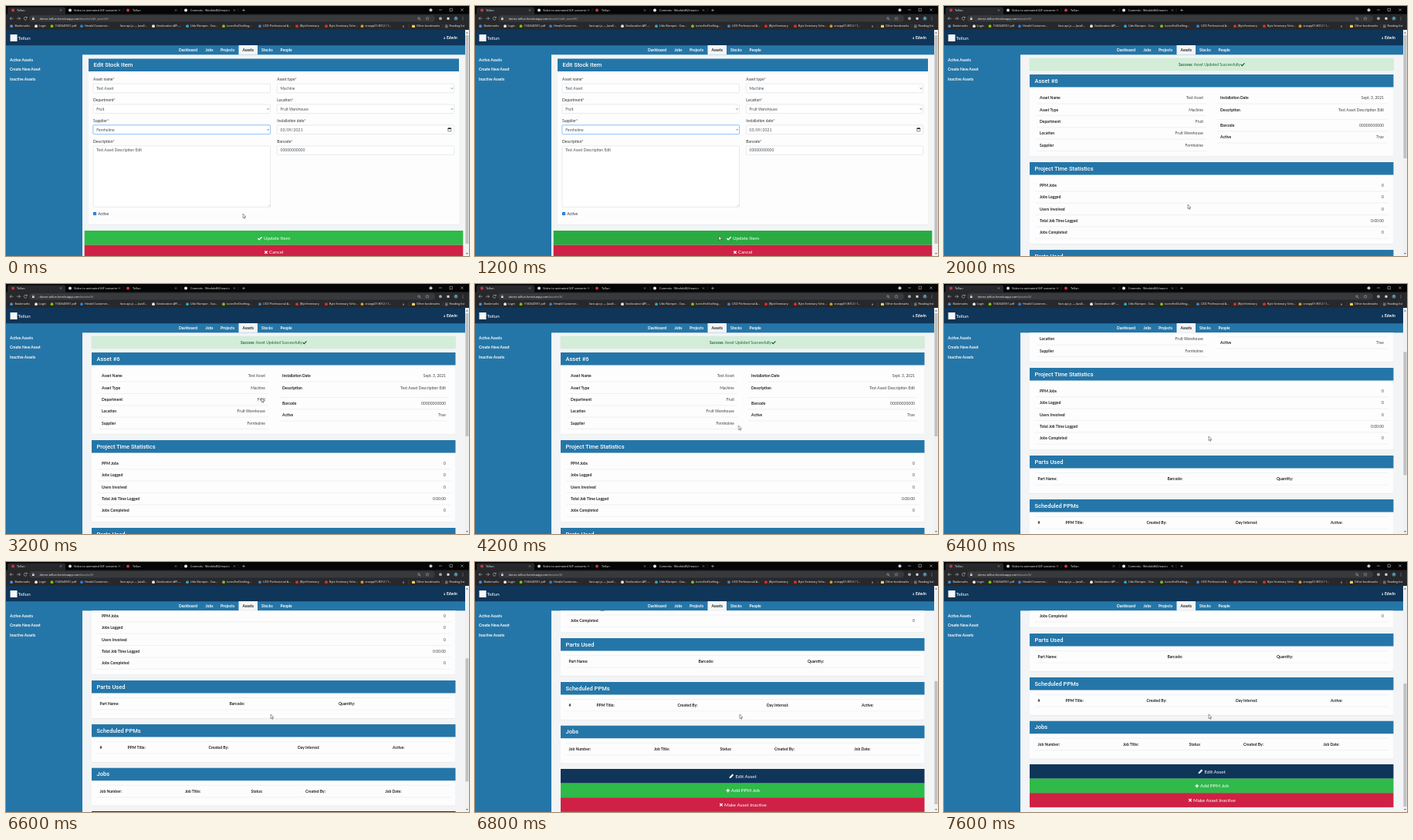
Animation of 600x325 px, one loop 8 s. Source, as an HTML page:

```html
<!DOCTYPE html>
<html lang="en">
<head>
<meta charset="utf-8">
<title>Asset manager</title>
<style>
html, body { margin: 0; width: 100%; height: 100%; overflow: hidden; background: #f3f4f5; }
svg { display: block; width: 600px; height: 325px; font: 5px Lato, sans-serif; }
.ui { font-family: "Open Sans", sans-serif; }
.head { font: 500 7.5px Roboto, sans-serif; }
#stage, #edit, #asset, #update, #cursor { animation: 8s step-end -20ms infinite; }
#stage { animation-name: scroll; }
#edit { animation-name: leave; }
#asset { animation-name: enter; }
#update { animation-name: hover; }
#cursor { animation-name: move; }
#sheet { transform: translateY(calc(var(--s) * -1px)); }
#thumb { transform: translateY(calc(var(--s) * .536px)); }
@keyframes leave { 0% { visibility: visible } 20%, 100% { visibility: hidden } }
@keyframes enter { 0% { visibility: hidden } 20%, 100% { visibility: visible } }
@keyframes hover { 0% { fill: #2fba49 } 7.5% { fill: #29ab42 } 20%, 100% { fill: #2fba49 } }
@keyframes scroll {
  0% { --s: 0 } 75% { --s: 12 } 77.5% { --s: 47 } 80% { --s: 94 }
  82.5% { --s: 163 } 85% { --s: 218 } 87.5%, 100% { --s: 224 }
}
@keyframes move {
  0% { transform: translate(307px, 270px) }
  2.5% { transform: translate(309px, 279px) }
  5% { transform: translate(313px, 291px) }
  7.5% { transform: translate(316px, 299px) }
  17.5% { transform: translate(316px, 297px) }
  20% { transform: translate(316px, 285px) }
  22.5% { transform: translate(316px, 268px) }
  25% { transform: translate(316px, 258px) }
  27.5% { transform: translate(319px, 178px) }
  30% { transform: translate(318px, 150px) }
  32.5% { transform: translate(317px, 128px) }
  35% { transform: translate(321px, 119.5px) }
  37.5% { transform: translate(327px, 128px) }
  40% { transform: translate(331px, 148px) }
  42.5% { transform: translate(332px, 170px) }
  45% { transform: translate(335px, 178px) }
  47.5% { transform: translate(338px, 182px) }
  50% { transform: translate(340px, 184px) }
  52.5% { transform: translate(341.5px, 184px) }
  55% { transform: translate(342px, 190px) }
  57.5% { transform: translate(342px, 206px) }
  60% { transform: translate(342.5px, 202px) }
  62.5%, 100% { transform: translate(343px, 198px) }
}
</style>
</head>
<body>
<svg id="stage" viewBox="0 0 600 325"></svg>
<script>
const blue = '#2576a8', navy = '#0f3559', green = '#2fba49', red = '#cf2145', bar = '#27282b';

// y is the middle of the text line
const text = (x, y, s, fill = '#333', size = 5, attr = '') =>
  `<text x="${x}" y="${y + size * .35}" fill="${fill}" font-size="${size}" ${attr}>${s}</text>`;
const bold = (x, y, s, fill = '#222') => text(x, y, s, fill, 5, 'font-weight="700"');
const right = (x, y, s) => text(x, y, s, '#444', 5, 'text-anchor="end"');
const ui = (x, y, s, size = 3.7, fill = '#f4f5f6') => text(x, y, s, fill, size, 'class="ui"');
const rect = (x, y, w, h, fill, attr = '') =>
  `<rect x="${x}" y="${y}" width="${w}" height="${h}" fill="${fill}" ${attr}/>`;
const dot = (x, y, r, fill) => `<circle cx="${x}" cy="${y}" r="${r}" fill="${fill}"/>`;
const line = (d, color = '#dcdfe2', w = .4) =>
  `<path d="${d}" fill="none" stroke="${color}" stroke-width="${w}"/>`;
const rule = (x, y, w) => line(`M${x} ${y}h${w}`);
const check = (x, y, c, k = 1) =>
  line(`M${x - 2.6 * k} ${y}l${1.8 * k} ${1.8 * k} ${3.6 * k} ${-3.6 * k}`, c, 1.3 * k);
const cross = (x, y, r, c, w) =>
  line(`M${x - r} ${y - r}l${2 * r} ${2 * r}m0 ${-2 * r}l${-2 * r} ${2 * r}`, c, w);
const plus = (x, y, r, c, w) => line(`M${x - r} ${y}h${2 * r}M${x} ${y - r}v${2 * r}`, c, w);
const title = (x, y, s) => text(x, y, s, '#fff', 7.5, 'class="head"');

function card(x, y, w, h, name) {
  return rect(x, y + .6, w, h, '#dfe1e3', 'rx="1.5"') + rect(x, y, w, h, '#fdfdfd', 'rx="1.5"') +
    rect(x, y, w, 16.5, blue) + title(x + 6.5, y + 8, name);
}

function button(y, fill, x, s, icon, left = 111, w = 471.5, attr = '') {
  return rect(left, y, w, 18.7, fill, attr) + icon + text(x, y + 9.5, s, '#fff', 6.25);
}

function browser() {
  const gray = '#dcdee1';
  let out = rect(0, 0, 600, 11, '#050506') + rect(0, 10.5, 600, 20.5, bar) +
    rect(2, 1.5, 75, 11, bar, 'rx="2"') + rect(30, 12, 526, 8.4, '#38393c', 'rx="4.2"');
  const tabs = [[9, 14, 'Tellun', 71, '#c8383f'], [83, 88, 'Video to animated GIF converte', 147, '#d5d8dc'],
    [158, 164, 'Tellun', 220, '#c8383f'], [233, 239, 'Commits · Wexfold82/react-r', 296, '#f0f0f0']];
  for (const [ix, x, s, cx, c] of tabs)
    out += dot(ix, 5.5, 2, c) + ui(x, 5.3, s, 3.85) + cross(cx, 5.5, 1.1, gray, .4);
  out += plus(308, 5.5, 1.8, gray, .5) + line('M152 3v5M227 3v5M301 3v5', '#555', .3) +
    dot(550.5, 5.2, 2, '#c6c8cb') + line('M561 5h4M575 3.2h3.4v3.4h-3.4z', gray, .5) + cross(591, 5, 1.6, gray, .5);
  // toolbar
  out += line('M9.5 16.2h-4.5m2-2l-2 2 2 2M14 16.2h4.5m-2-2l2 2-2 2', gray, .5) +
    line('M27 15.2a2 2 0 1 0 .1 1.8M27.3 13.8v1.6h-1.6', gray, .5) +
    rect(34, 15.8, 2.6, 2.2, gray) + line('M34.5 16v-.8a.8.8 0 0 1 1.6 0v.8', gray, .4) +
    line('M536 17l1.4 1.4', gray, .5) + `<circle cx="535" cy="16" r="1.3" fill="none" stroke="${gray}" stroke-width=".4"/>` +
    line('M546 14l.7 1.5 1.6.1-1.2 1 .4 1.6-1.5-.8-1.5.8.4-1.6-1.2-1 1.6-.1z', gray, .3) +
    dot(563, 16.2, 2, '#9aa0a6') + rect(571.5, 14.8, 3, 3, gray) + dot(583, 16.2, 2.5, '#3e7d8a') +
    ui(582.4, 16.2, 'E', 2.8) + dot(592, 14.4, .45, gray) + dot(592, 16.2, .45, gray) + dot(592, 18, .45, gray);
  // bookmarks
  const marks = [[7, 11.5, 'Bookmarks', '#4a90e2'], [39, 42.5, 'Login', '#eee'], [59.5, 63.5, '1582640931.pdf', '#7ac70c'],
    [98, 102, 'Herald Customer...', '#2f80d8'], [144, 148, 'face-api.js — JavaS...', bar],
    [191, 195, 'Geolocation API -...', '#eee'], [235, 239, 'Udo Klamper - Coa...', '#27a9d6'],
    [282, 286, 'tunesForDrafting...', '#78c52a'], [329, 333, 'UCD Professional A...', '#3c86c8'],
    [377, 381, 'JByteSeminary', '#d8322f'], [415, 419, 'Byte Seminary Sche...', '#d8322f'],
    [461.5, 465.5, 'srvapp01:8012 / 1...', '#d99a2b']];
  for (const [ix, x, s, c] of marks) out += dot(ix, 26.2, 1.9, c) + ui(x, 26.2, s);
  return out + ui(514, 26, '»', 4.4) + line('M522 23.5v5.5M566 23.5v5.5', '#66696d', .3) +
    rect(526, 24.8, 4, 3.2, '#f2cf63', 'rx=".4"') + ui(532, 26.2, 'Other bookmarks') +
    line('M569 25h3.6M569 26.4h3.6M569 27.8h3.6', gray, .5) + ui(574.5, 26.2, 'Reading list');
}

function frame() {
  let out = rect(0, 31, 595, 20, navy) + rect(0, 51, 595, 12.3, blue) + rect(0, 63, 99, 262, blue) +
    rect(0, 51, 595, .7, '#1e628f') + rect(5.5, 37, 9, 9, '#f4f7fa') + text(15.5, 41.6, 'Tellun', '#fff', 6.25) +
    dot(568.2, 41, .65, '#fff') + '<path d="M567.1 43q1.1-2 2.2 0z" fill="#fff"/>' + bold(571, 41.5, 'Edwin', '#fff') +
    rect(301.5, 51, 24.5, 12.3, '#f3f4f5');
  const nav = [[224, 'Dashboard'], [258.5, 'Jobs'], [278, 'Projects'], [306.5, 'Assets'], [331, 'Stocks'], [355.5, 'People']];
  for (const [x, s] of nav) out += bold(x, 57.1, s, s == 'Assets' ? '#222' : '#fff');
  ['Active Assets', 'Create New Asset', 'Inactive Assets'].forEach((s, i) => out += bold(5, 70.3 + i * 12.4, s, '#fff'));
  return out + rect(595, 31, 5, 294, '#f1f1f1') +
    '<path d="M596 35.5l1.5-1.8 1.5 1.8zM596 321l1.5 1.8 1.5-1.8z" fill="#666"/>';
}

const url = path => ui(43.5, 16.5, 'dorne-tellun.herokuapp.com<tspan fill="#b4b7bb">/assets/' + path + '</tspan>', 3.9);

function field(x, y, label, value, kind, h = 11.6) {
  const focus = label == 'Supplier';
  const end = x + 229.5;
  let out = text(x, y, label + '<tspan fill="#444">*</tspan>');
  if (focus) out += rect(x - .7, y + 5.3, 230.9, h + 1.4, '#bfdeff', 'rx="1.6"');
  out += rect(x, y + 6, 229.5, h, '#fff', `rx="1.2" stroke="${focus ? '#5ba4ee' : '#ced4da'}" stroke-width=".5"`) +
    text(x + 4.2, y + 11.9, value, '#495057', 5, kind == 'date' ? 'letter-spacing=".15"' : '');
  if (kind == 'select') out += line(`M${end - 4} ${y + 11.2}l1.2 1.3 1.2-1.3`, '#333', .6);
  if (kind == 'date') out += line(`M${end - 8} ${y + 10}h4v4h-4z`, '#222', .5) + rect(end - 8, y + 9.6, 4, 1.5, '#222');
  if (kind == 'area') out += line(`M${end - 3} ${y + h + 5.4}l2.4-2.4m-1 2.4l1-1`, '#888', .3);
  return out;
}

function editPage() {
  return url('edit_asset/6/') + '<g clip-path="url(#view)">' + card(107, 68.5, 480, 215.5, 'Edit Stock Item') +
    field(113, 95.2, 'Asset name', 'Test Asset') + field(351.3, 95.2, 'Asset type', 'Machine', 'select') +
    field(113, 122, 'Department', 'Fruit', 'select') + field(351.3, 122, 'Location', 'Fruit Warehouse', 'select') +
    field(113, 148.9, 'Supplier', 'Fernholme', 'select') + field(351.3, 148.9, 'Installation date', '03/09/2021', 'date') +
    field(113, 175.8, 'Description', 'Test Asset Description Edit', 'area', 79.5) + field(351.3, 175.8, 'Barcode', '00000000000') +
    rect(113, 268, 4.1, 4.1, '#0b6fd3', 'rx=".6"') + check(115.2, 270.1, '#fff', .45) + text(119.3, 270.1, 'Active') +
    button(292, green, 334, 'Update Item', check(329, 302, '#fff'), 101.7, 490.6, 'id="update"') +
    button(310.7, red, 341, 'Cancel', cross(337, 320.2, 1.7, '#fff', 1.3), 101.7, 490.6) +
    '</g>' + rect(595.5, 38, 4, 271, '#c1c1c1');
}

const pair = (x, end, y, label, value) => bold(x, y, label) + right(end, y, value);

function table(y, name, cols) {
  let out = card(111, y, 471.5, 49, name) + rule(118, y + 22.5, 458) + rule(118, y + 38, 458);
  for (const [x, s] of cols) out += bold(x, y + 30.4, s);
  return out;
}

function assetPage() {
  let out = url('6/') + '<g clip-path="url(#view)"><g id="sheet">' +
    rect(111, 68, 471.5, 16, '#d3edd9', 'rx="1.2" stroke="#c3e6cb" stroke-width=".4"') +
    text(304, 76, '<tspan font-weight="700">Success:</tspan> Asset Updated Successfully', '#1b6b30') +
    check(387, 76, '#155724', .9) + card(111, 89, 471.5, 106.5, 'Asset #6');
  const left = [['Asset Name', 'Test Asset'], ['Asset Type', 'Machine'], ['Department', 'Fruit'],
    ['Location', 'Fruit Warehouse'], ['Supplier', 'Fernholme']];
  left.forEach(([k, v], i) => {
    const y = 119.5 + i * 15.35;
    out += pair(124, 336, y, k, v) + rule(120, y + 7.6, 220);
  });
  const info = [[119.5, 'Installation Date', 'Sept. 3, 2021', 127.1], [134.8, 'Description', 'Test Asset Description Edit', 147.5],
    [155.2, 'Barcode', '00000000000', 162.8], [170.5, 'Active', 'True', 178.1]];
  for (const [y, k, v, ly] of info) out += pair(358, 570, y, k, v) + rule(354, ly, 220);
  out += card(111, 203, 471.5, 106.5, 'Project Time Statistics');
  ['PPM Jobs', 'Jobs Logged', 'Users Involved', 'Total Job Time Logged', 'Jobs Completed'].forEach((k, i) => {
    const y = 233.2 + i * 15.35;
    out += pair(124, 570, y, k, i == 3 ? '0:00:00' : '0') + rule(118, y + 7.6, 458);
  });
  out += table(317, 'Parts Used', [[121.5, 'Part Name:'], [289.5, 'Barcode:'], [431, 'Quantity:']]) +
    table(374, 'Scheduled PPMs', [[121.5, '#'], [157.5, 'PPM Title:'], [262.5, 'Created By:'], [378, 'Day Interval:'], [501, 'Active:']]) +
    table(430.7, 'Jobs', [[121.5, 'Job Number:'], [232, 'Job Title:'], [317.5, 'Status:'], [388, 'Created By:'], [491.5, 'Job Date:']]) +
    button(487, navy, 337.5, 'Edit Asset', '<path d="M329.6 499.2l.5-2 3.6-3.6 1.5 1.5-3.6 3.6z" fill="#fff"/>') +
    button(505.6, green, 332, 'Add PPM Job', plus(327.8, 515.2, 2.4, '#fff', 1.3)) +
    button(524.2, red, 323, 'Make Asset Inactive', cross(319, 533.7, 1.7, '#fff', 1.3));
  return out + '</g></g>' + rect(595.5, 38, 4, 160, '#c1c1c1', 'id="thumb"');
}

document.getElementById('stage').innerHTML =
  '<clipPath id="view"><rect x="99" y="63.3" width="496" height="262"/></clipPath>' +
  rect(0, 0, 600, 325, '#f3f4f5') + browser() + frame() +
  `<g id="edit">${editPage()}</g><g id="asset">${assetPage()}</g>` +
  '<path id="cursor" d="M0 0V5.6L1.3 4.4 2.2 6.4 3 6 2.1 4.1H3.9Z" fill="#fff" stroke="#222" stroke-width=".45"/>';
</script>
</body>
</html>
```
